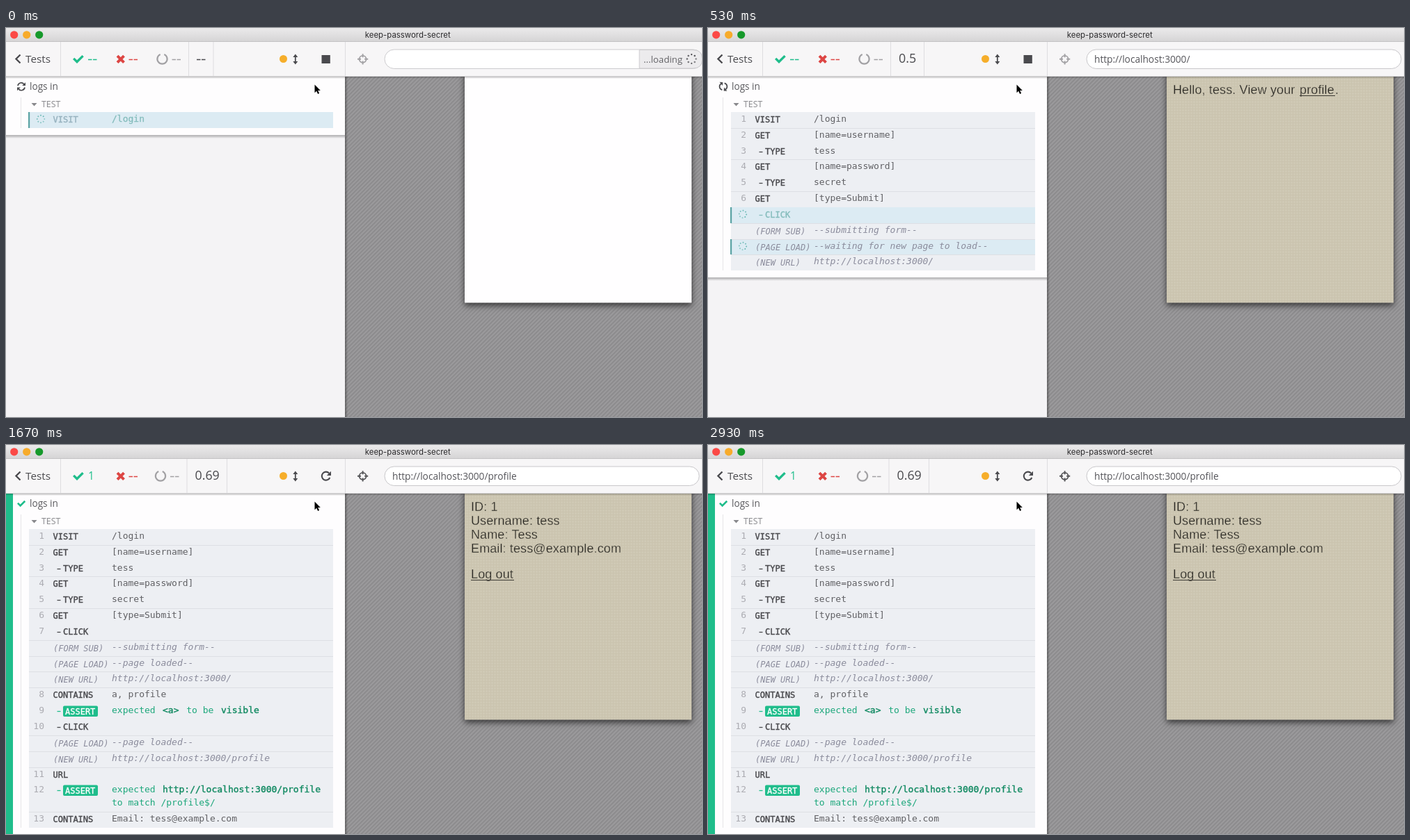
Write an HTML page that moves like this. It is 1000x560 px and loops after 2990 ms.

```html
<!DOCTYPE html>
<html lang="en">
<head>
<meta charset="utf-8">
<title>Test runner</title>
<style>
html, body { margin: 0; width: 100%; height: 100%; overflow: hidden; background: #f4f3f5; }
svg { display: block; width: 1000px; height: 560px; }
text { white-space: pre; }
.ui { font-family: "Open Sans", sans-serif; }
.mono { font-family: "DejaVu Sans Mono", monospace; }
.page { font: 18px "Liberation Sans", sans-serif; letter-spacing: .12px; fill: #26241f; stroke-width: .3px; }
.title { font: 11.4px Inter, sans-serif; }
.it { font-style: italic; }
</style>
</head>
<body>
<svg viewBox="0 0 1000 560" xmlns="http://www.w3.org/2000/svg">
  <defs>
    <linearGradient id="bar" x2="0" y2="1"><stop stop-color="#ebeaeb"/><stop offset="1" stop-color="#d5d4d5"/></linearGradient>
    <linearGradient id="fade" x2="0" y2="1"><stop stop-opacity=".25"/><stop offset="1" stop-opacity="0"/></linearGradient>
    <linearGradient id="side"><stop stop-opacity=".35"/><stop offset="1" stop-opacity="0"/></linearGradient>
    <pattern id="stripes" width="4" height="4" patternUnits="userSpaceOnUse" patternTransform="rotate(45)">
      <rect width="4" height="4" fill="#9b9a9c"/><rect width="1.7" height="4" fill="#8a898b"/>
    </pattern>
    <pattern id="cloth" width="4" height="4" patternUnits="userSpaceOnUse">
      <rect width="4" height="4" fill="#cfc9b5"/><path d="M0 .5H4M.5 0V4" stroke="#cac3ae"/>
    </pattern>
    <filter id="shadow" x="-10%" y="-10%" width="120%" height="120%">
      <feDropShadow dx="0" dy="4" stdDeviation="5" flood-opacity=".65"/>
    </filter>
  </defs>
  <g id="stage"></g>
</svg>
<script>
const LOOP = 2990, HOST = 'http://localhost:3000/', USER = 'tess', MAIL = USER + '@example.com';
const ROW = 22.85, TOP = 120.8;
const INK = '#4a4a4e', GREEN = '#1fbd8b', BUSY = '#84bcbc';

// kind: c = command, k = child command, e = page event, a = assertion
const rows = [
  ['c', 'VISIT', '/login'],
  ['c', 'GET', '[name=username]'],
  ['k', 'TYPE', USER],
  ['c', 'GET', '[name=password]'],
  ['k', 'TYPE', 'secret'],
  ['c', 'GET', '[type=Submit]'],
  ['k', 'CLICK', ''],
  ['e', '(FORM SUB)', '--submitting form--'],
  ['e', '(PAGE LOAD)', '--page loaded--'],
  ['e', '(NEW URL)', HOST],
  ['c', 'CONTAINS', 'a, profile'],
  ['a', 'ASSERT', ['<a>', 'to be', 'visible']],
  ['k', 'CLICK', ''],
  ['e', '(PAGE LOAD)', '--page loaded--'],
  ['e', '(NEW URL)', HOST + 'profile'],
  ['c', 'URL', ''],
  ['a', 'ASSERT', [HOST + 'profile'], 'to match /profile$/'],
  ['c', 'CONTAINS', 'Email: ' + MAIL]
];

const state = (at, count, busy, clock, path, page) => ({ at, count, busy, clock, path, page });
const states = [
  state(0, 1, [0], '', null, blank),
  state(70, 1, [0], '0.1', null, blank),
  state(130, 3, [2], '0.1', 'login', () => login('', -1)),
  state(200, 3, [2], '0.2', 'login', () => login(USER.slice(0, 3), -1)),
  state(270, 5, [4], '0.3', 'login', () => login(USER, 0)),
  state(330, 5, [4], '0.3', 'login', () => login(USER, 5)),
  state(400, 7, [6], '0.4', 'login', () => login(USER, 6)),
  state(470, 9, [6, 8], '0.5', 'login', () => login(USER, 6)),
  state(530, 10, [6, 8], '0.5', '', hello),
  state(600, 14, [12, 13], '0.6', '', hello),
  state(670, 18, [], '0.69', 'profile', profile)
];

const esc = s => String(s).replace(/&/g, '&amp;').replace(/</g, '&lt;');
const rect = (x, y, w, h, fill, more = '') => `<rect x="${x}" y="${y}" width="${w}" height="${h}" fill="${fill}" ${more}/>`;
const path = (d, stroke, width = 1, more = '') => `<path d="${d}" fill="none" stroke="${stroke}" stroke-width="${width}" ${more}/>`;
const shape = (d, fill, more = '') => `<path d="${d}" fill="${fill}" ${more}/>`;
const dot = (x, y, r, fill) => `<circle cx="${x}" cy="${y}" r="${r}" fill="${fill}"/>`;
const text = (cls, x, y, s, size, fill, more = '') =>
  `<text class="${cls}" x="${x}" y="${y}" font-size="${size}" fill="${fill}" ${more}>${esc(s)}</text>`;
const ui = (x, y, s, size, fill = INK) => text('ui', x, y, s, size, fill);
const mono = (x, y, s, fill, more) => text('mono', x, y, s, 13, fill, more);
const heavy = (color, w = .4) => `stroke="${color}" stroke-width="${w}"`;
const dashes = (x, color) => path(`M${x} 45.5h5.5m1.5 0h5.5`, color, 1.5);
const at = (x, y, deg, body) => `<g transform="translate(${x} ${y}) rotate(${deg})">${body}</g>`;

function check(x, y, k) {
  return shape('M0 6.5 2.3 4.2 6 7.8 13.4.4 15.8 2.8 6 12.6Z', GREEN, `transform="translate(${x} ${y}) scale(${k})"`);
}

function spinner(x, y, r, color, deg) {
  let s = '';
  for (let i = 0; i < 8; i++) {
    const a = i * Math.PI / 4;
    s += `<circle cx="${(r * Math.cos(a)).toFixed(2)}" cy="${(r * Math.sin(a)).toFixed(2)}" r="${r / 5.4}" fill="${color}" opacity="${.65 + i * .05}"/>`;
  }
  return at(x, y, deg, s);
}

function refresh(deg) {
  const half = path('M-5 -1.2A5 5 0 0 1 3.8 -3.6', INK, 1.7) + shape('M6 -6V-1.2H1.2Z', INK);
  return at(22, 84.3, deg, half + `<g transform="rotate(180)">${half}</g>`);
}

// Page text: a thin outline in the backdrop colour lightens the strokes.
const pageText = (x, y, s, back = '#cfc9b5') => `<text class="page" x="${x}" y="${y}" stroke="${back}">${esc(s)}</text>`;
const underline = (x, y, w) => path(`M${x} ${y}h${w}`, '#3a3832');

function blank() { return ''; }

function login(user, typed) {
  const field = '#dad4c1';
  let s = rect(763, 79, 205, 37, field) + rect(759, 116, 205, 37, field) + rect(668, 153, 74, 37, '#b9b2a0')
    + pageText(668, 103, 'Username:') + pageText(668, 140, 'Password:') + pageText(676, 178, 'Submit', '#b9b2a0')
    + pageText(771, 103, user, field);
  for (let i = 0; i < typed; i++) s += dot(771 + i * 8, 134, 2.6, '#45433c');
  const x = typed < 0 ? 772 + user.length * 8.5 : 768 + typed * 8;
  const y = typed < 0 ? 87 : 124;
  return s + path(`M${x} ${y}v20`, '#3c3a34');
}

function hello() {
  return pageText(668, 95, `Hello, ${USER}. View your`) + pageText(850, 95, 'profile') + pageText(901, 95, '.') + underline(850, 97.5, 51);
}

function profile() {
  return ['ID: 1', 'Username: ' + USER, 'Name: ' + USER[0].toUpperCase() + USER.slice(1), 'Email: ' + MAIL]
    .map((s, i) => pageText(668, 95 + i * 20, s)).join('') + pageText(668, 192, 'Log out') + underline(668, 194.5, 62);
}

function message(row, y, busy) {
  const [kind, , msg, tail] = row;
  if (kind === 'a') {
    const dark = '#128a62', lit = '#1ca77b';
    let x = 225, s = mono(152, y, 'expected', lit);
    msg.forEach((m, i) => {
      s += mono(x, y, m, i % 2 ? lit : dark, i % 2 ? '' : heavy(dark));
      x += m.length * 7.83 + 10.7;
    });
    return s + (tail ? mono(152, y + 19, tail, lit) : '');
  }
  if (kind === 'e') {
    const s = busy ? '--waiting for new page to load--' : msg;
    return text('mono it', 152, y, s, 13, '#8b8c9c');
  }
  return mono(152, y, msg, busy ? BUSY : '#606064', busy ? heavy(BUSY, .3) : '');
}

function log(st, deg, done) {
  let edge = TOP, num = 0, s = '';
  for (let i = 0; i < st.count; i++) {
    const row = rows[i], [kind, name] = row, busy = st.busy.includes(i);
    const y = Math.round(edge), event = kind === 'e', child = kind === 'k' || kind === 'a';
    edge += row[3] ? 41.6 : ROW;
    const h = Math.round(edge) - y, base = y + 15;
    const color = busy ? (i ? BUSY : '#97b2bf') : INK;
    s += rect(33, y, 437, h, busy ? '#dcebf3' : '#edeff3');
    if (i && !child) s += path(`M33 ${y + .5}H470`, '#dddfe4');
    if (busy) s += rect(32, y, 2.2, h, '#5ba3a4') + spinner(50, y + 10, 5.2, '#63b5b0', deg);
    if (!event) {
      num++;
      if (!busy) s += mono(55, y + 14, num, '#acacb2', 'text-anchor="end"');
    }
    if (child) s += path(`M73.5 ${base - 3.5}h5`, kind === 'a' ? GREEN : color, 1.3);
    if (kind === 'a') s += rect(82, y + 3.5, 50, 15.5, GREEN, 'rx="2"') + text('mono', 85, base + .5, name, 12, '#fff', heavy('#fff', .3));
    else if (event) s += text('mono it', 68, base + .5, name, 12, '#8b8c9c');
    else s += text('mono', child ? 82 : 67.5, base, name, 12, color, heavy(color));
    s += message(row, y + 14, busy);
  }
  const end = done ? 560 : Math.round(edge) + 11;
  const panel = rect(0, 70, 487, end - 70, '#fefdfe')
    + (done ? rect(0, 70, 10, 490, GREEN) : rect(0, end, 487, 4, 'url(#fade)') + path(`M0 ${end - .5}H487`, '#b9b8ba'));
  return panel + path(`M21.5 100V${Math.round(edge)}`, '#e6e5e8') + s
    + (done ? check(16, 79.5, .77) : refresh(deg)) + ui(34, 89, 'logs in', 13.6, '#58585c')
    + shape('M36.5 108h8l-4 4.5Z', '#88888c') + ui(51, 114, 'TEST', 12.3, '#88888c');
}

function header(st, deg, done) {
  const split = done ? 260 : 262.5, right = done ? 317.5 : st.clock ? 310.5 : 298;
  const aim = done ? '#555558' : '#a2a1a4', gray = '#a2a1a4';
  let s = rect(0, 20, 1000, 50, '#f7f6f7') + rect(0, 70, 1000, 3, 'url(#fade)') + path('M0 69.5H1000', '#d2d1d3')
    + path(`M78.5 20V69M${split} 20V69M${right} 20V69M487.5 20V69`, '#dedde0')
    + path('M20.5 38.5 14.5 44.5 20.5 50.5', INK, 2.4) + ui(28, 49.7, 'Tests', 15.3)
    + check(96, 38.5, 1)
    + path('M160 40.2 169.5 49.7M169.5 40.2 160 49.7', '#dd4644', 4) + dashes(176.5, '#dd4644')
    + (done ? ui(118, 50, '1', 15.5, GREEN) : dashes(118, GREEN));
  const ring = done ? 222 : 224.5;
  s += path(`M${ring - 2.8} 38a7.1 7.1 0 1 0 5.6 0`, gray, 2.2) + dashes(ring + 14, gray);
  s += st.clock ? ui(done ? 271.5 : 274, 50.3, st.clock, 17.8) : dashes(274, INK);
  s += dot(398.5, 44.5, 5.5, '#f6ae2b') + path('M415.8 40V50', INK, 1.8)
    + shape('M412.3 42 415.8 37.5 419.3 42ZM412.3 48 415.8 52.5 419.3 48Z', INK);
  s += done
    ? path('M464.2 40.6A6 6 0 1 0 465.3 47', INK, 2.1) + shape('M467 37.8V44H460.8Z', INK)
    : rect(453.5, 39, 12.3, 12, INK);
  s += `<circle cx="512.6" cy="44.8" r="5" fill="none" stroke="${aim}" stroke-width="1.8"/>`
    + path('M512.6 37.2v5M512.6 47.4v5M505 44.8h5M515.2 44.8h5', aim, 1.9);
  if (st.path === null) {
    s += rect(544, 31, 457, 27.5, '#fff', 'rx="13.7" stroke="#cccbce"')
      + shape('M910 31.5H987Q1000.5 31.5 1000.5 44.8T987 58H910Z', '#ecebed', 'stroke="#cccbce"')
      + ui(916, 49.5, '...loading', 13.2, '#626266') + spinner(985, 44.5, 6.4, INK, deg);
  } else {
    s += rect(544, 31, 452, 27.5, '#fff', 'rx="13.7" stroke="#c8c7ca"') + ui(555, 49.5, HOST + st.path, 13.7, '#55555a');
  }
  return s;
}

function scene(st) {
  const deg = st.at * .18, done = !st.busy.length;
  return rect(0, 0, 1000, 560, '#f4f3f5') + log(st, deg, done)
    + rect(487, 70, 513, 490, 'url(#stripes)') + rect(487, 70, 4, 490, 'url(#side)')
    + rect(659, 60, 326, 335.3, st.page === blank ? '#fffeff' : 'url(#cloth)', 'filter="url(#shadow)"') + st.page()
    + header(st, deg, done)
    + rect(0, 0, 1000, 20, 'url(#bar)') + path('M0 19.5H1000', '#c3c2c4')
    + dot(11.7, 9.8, 5.6, '#fb4946') + dot(29.7, 9.8, 5.6, '#f7ab2b') + dot(47.7, 9.8, 5.6, '#16992b')
    + text('title', 577.3, 14, 'keep-password-secret', 11.4, '#2c2b2d', 'text-anchor="middle"')
    + shape('M443.5 81.5V93.2L446.2 90.8 448.1 95 450.1 94.1 448.2 90H451.8Z', '#000', 'stroke="#fff" stroke-width="1" paint-order="stroke"');
}

const stage = document.getElementById('stage');
let shown = null;
function draw(now) {
  const t = now % LOOP;
  let st = states[0];
  for (const s of states) if (s.at <= t) st = s;
  if (st !== shown) stage.innerHTML = scene(shown = st);
}
function tick() {
  draw(performance.now());
  requestAnimationFrame(tick);
}
tick();
</script>
</body>
</html>
```
